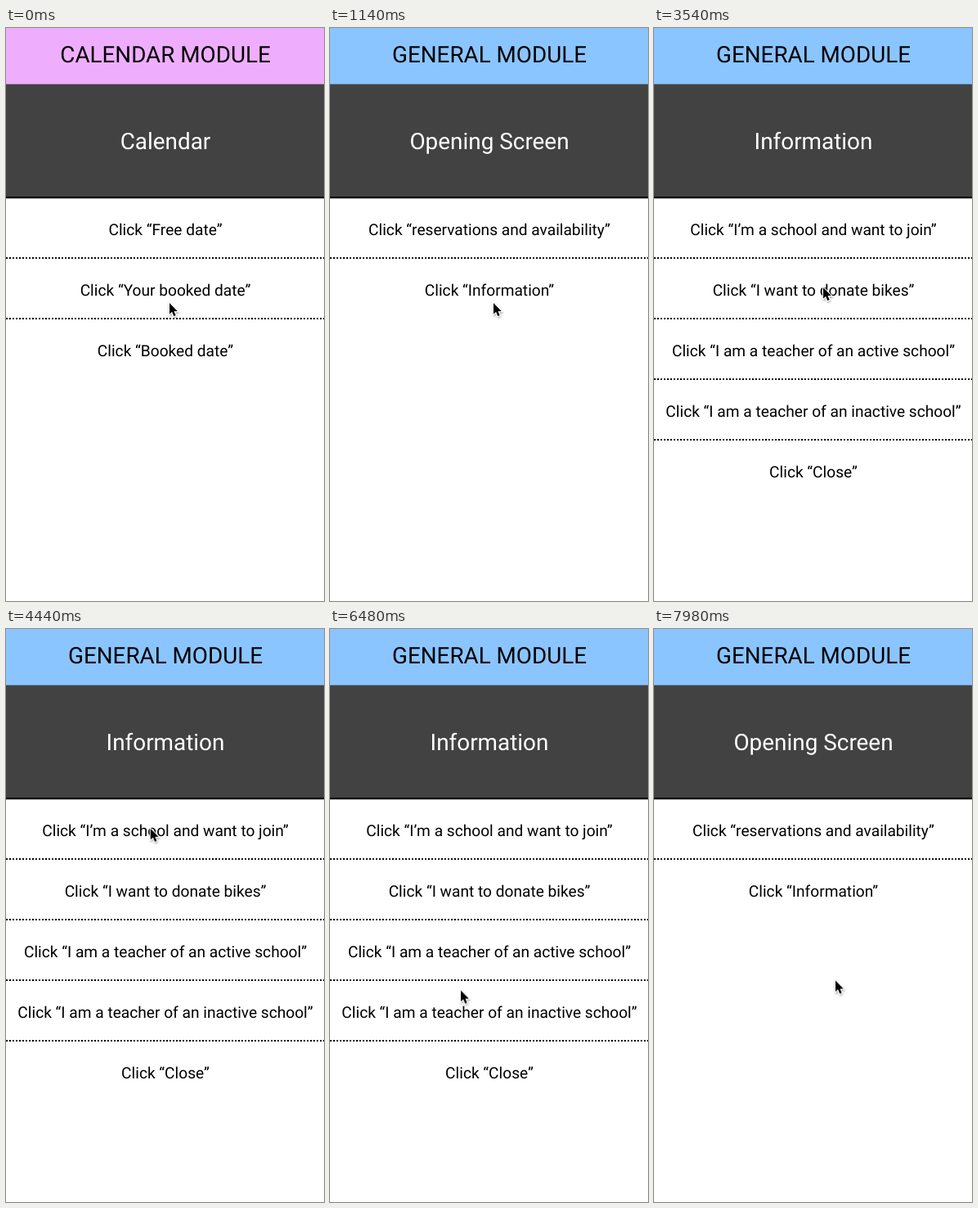
Animation, 389 px wide and 700 px high, one loop 8 s. Source, as an HTML page:

```html
<!DOCTYPE html>
<html lang="en">
<head>
<meta charset="utf-8">
<title>Module flow</title>
<style>
  html, body { margin: 0; width: 100%; height: 100%; overflow: hidden; background: #fff; }
  svg { display: block; width: 100vw; height: 100vh; }
  text {
    font-family: Roboto, Arial, sans-serif;
    text-anchor: middle;
    text-rendering: geometricPrecision;
  }
  .head { font-size: 27.8px; }
  .title { font-size: 27.9px; fill: #fff; }
  .row { font-size: 19.15px; }
  .dots { stroke: #000; stroke-width: 2; stroke-dasharray: 2 2; }

  .screen { visibility: hidden; animation: 8s step-end infinite; }
  #calendar { animation-name: calendar; }
  #opening { animation-name: opening; }
  #info { animation-name: info; }
  @keyframes calendar {
    0% { visibility: visible; }
    12.75%, 100% { visibility: hidden; }
  }
  @keyframes opening {
    0% { visibility: hidden; }
    12.75% { visibility: visible; }
    42% { visibility: hidden; }
    93%, 100% { visibility: visible; }
  }
  @keyframes info {
    0% { visibility: hidden; }
    42% { visibility: visible; }
    93%, 100% { visibility: hidden; }
  }

  #cursor { animation: roam 8s ease-in-out infinite; }
  @keyframes roam {
    0% { transform: translate(200px, 336px); }
    5.25% { transform: translate(205px, 377px); }
    10.5%, 14.25% { transform: translate(200px, 336px); }
    20.25%, 28.5% { transform: translate(225px, 466px); animation-timing-function: ease-in; }
    35.25% { transform: translate(227px, 389.5px); animation-timing-function: ease-out; }
    44.25%, 49.5% { transform: translate(207px, 317px); }
    56.25% { transform: translate(176px, 242px); }
    64.5% { transform: translate(164px, 308.5px); }
    73% { transform: translate(162px, 384px); }
    81% { transform: translate(160px, 441.5px); }
    84% { transform: translate(164px, 464px); }
    91%, 93% { transform: translate(206px, 545px); }
    99.75%, 100% { transform: translate(222px, 429.5px); }
  }
</style>
</head>
<body>
<svg viewBox="0 0 389 700" preserveAspectRatio="none">
  <defs>
    <filter id="soft" x="-50%" y="-50%" width="200%" height="200%">
      <feDropShadow dx="0.5" dy="1.5" stdDeviation="1" flood-color="#000" flood-opacity=".35"/>
    </filter>
  </defs>

  <rect width="389" height="700" fill="#fff"/>
  <rect y="68" width="389" height="138" fill="#424242"/>
  <rect y="206" width="389" height="2.2"/>

  <g class="screen" id="calendar">
    <rect width="389" height="68.6" fill="#efaefd"/>
    <text class="head" x="195" y="42">CALENDAR MODULE</text>
    <text class="title" x="195" y="148">Calendar</text>
    <path class="dots" d="M0 281H389M0 355H389"/>
    <text class="row" x="195" y="253">Click “Free date”</text>
    <text class="row" x="195" y="327">Click “Your booked date”</text>
    <text class="row" x="195" y="401">Click “Booked date”</text>
  </g>

  <g class="screen" id="opening">
    <rect width="389" height="68.6" fill="#8bc5ff"/>
    <text class="head" x="195" y="42">GENERAL MODULE</text>
    <text class="title" x="195" y="148">Opening Screen</text>
    <path class="dots" d="M0 281H389"/>
    <text class="row" x="195" y="253">Click “reservations and availability”</text>
    <text class="row" x="195" y="327">Click “Information”</text>
  </g>

  <g class="screen" id="info">
    <rect width="389" height="68.6" fill="#8bc5ff"/>
    <text class="head" x="195" y="42">GENERAL MODULE</text>
    <text class="title" x="195" y="148">Information</text>
    <path class="dots" d="M0 281H389M0 355H389M0 429H389M0 503H389"/>
    <text class="row" x="195" y="253">Click “I’m a school and want to join”</text>
    <text class="row" x="195" y="327">Click “I want to donate bikes”</text>
    <text class="row" x="195" y="401">Click “I am a teacher of an active school”</text>
    <text class="row" x="195" y="475">Click “I am a teacher of an inactive school”</text>
    <text class="row" x="195" y="549">Click “Close”</text>
  </g>

  <g id="cursor">
    <path d="M0 0V13.6L3.1 10.8L5.3 16L7.7 15L5.5 10H9.8Z" fill="#000" stroke="#fff"
      stroke-width="2" paint-order="stroke" filter="url(#soft)"/>
  </g>
</svg>
</body>
</html>
```
